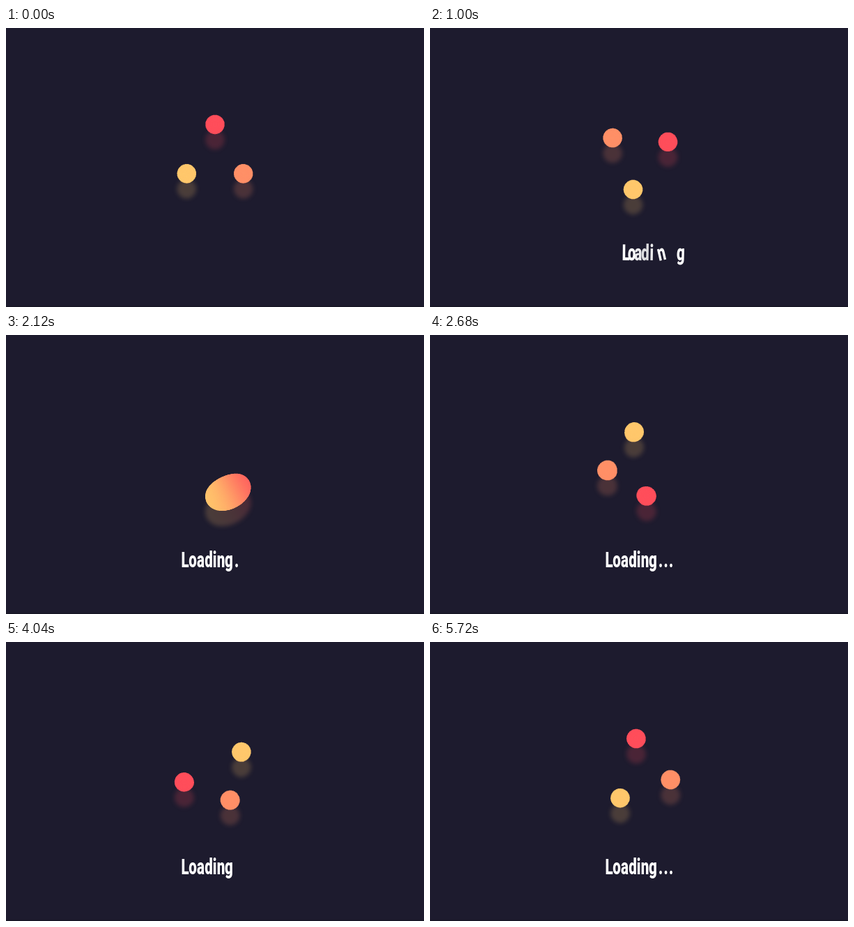
Recreate the animation shown at these times as an HTML page. Size 600 by 400 pixels, loop 5760 ms.

```html
<!DOCTYPE html>
<html lang="en">
<head>
<meta charset="utf-8">
<title>Loading</title>
<style>
  html, body { margin: 0; width: 100%; height: 100%; overflow: hidden; background: #1d1b2e; }
  svg { display: block; width: 600px; height: 400px; }
  text { font: 800 32px Roboto, "Open Sans", sans-serif; fill: #fff; text-anchor: middle; }
</style>
</head>
<body>
<svg viewBox="0 0 600 400">
  <defs>
    <!-- Blur the discs together, cut the alpha sharply, then add a soft shadow below. -->
    <filter id="goo" filterUnits="userSpaceOnUse" x="120" y="20" width="360" height="350"
            color-interpolation-filters="sRGB">
      <feGaussianBlur stdDeviation="18"/>
      <feColorMatrix values="1 0 0 0 0  0 1 0 0 0  0 0 1 0 0  0 0 0 82 -30.6" result="blob"/>
      <feOffset dy="22"/>
      <feGaussianBlur stdDeviation="3"/>
      <feColorMatrix values="1 0 0 0 0  0 1 0 0 0  0 0 1 0 0  0 0 0 .2 0" result="shadow"/>
      <feMerge>
        <feMergeNode in="shadow"/>
        <feMergeNode in="blob"/>
      </feMerge>
    </filter>
  </defs>
  <rect width="600" height="400" fill="#1d1b2e"/>
  <rect y="398.5" width="600" height="1.5" fill="#181725"/>
  <g id="balls" filter="url(#goo)"></g>
  <g id="word"></g>
</svg>
<script>
  const LOOP = 5760, STEP = 40, TURN_TIME = 5800;
  const CENTER = { x: 300, y: 185.3 }, ORBIT = 47, DISC = 20;
  const TEXT_Y = 322, CONDENSED = 0.64;

  const clamp = v => Math.max(0, Math.min(1, v));

  function add(parent, tag, attrs, content = '') {
    const el = document.createElementNS('http://www.w3.org/2000/svg', tag);
    for (const key in attrs) el.setAttribute(key, attrs[key]);
    el.textContent = content;
    return document.getElementById(parent).appendChild(el);
  }

  const balls = [
    { color: '#ff4d5a', start: -90, turns: 1 },
    { color: '#ff8f66', start: 30, turns: 3 },
    { color: '#ffc76b', start: 150, turns: 5 }
  ].map(b => ({ ...b, el: add('balls', 'circle', { r: DISC, fill: b.color }) }));

  const glyph = (char, x) => ({ x, el: add('word', 'text', { y: 11 }, char) });
  const centers = [257, 268, 279.5, 291, 299.5, 308.5, 320];
  const letters = [...'Loading'].map((char, i) => glyph(char, centers[i]));
  const dots = [331, 338.5, 346].map(x => glyph('.', x));

  function place({ el, x }, dx, angle, opacity) {
    el.setAttribute('transform',
      `translate(${x + dx} ${TEXT_Y}) rotate(${angle}) scale(${CONDENSED} 1)`);
    el.setAttribute('opacity', opacity);
  }

  function drawBalls(t) {
    for (const { el, start, turns } of balls) {
      const a = (start + 360 * turns * t / TURN_TIME) * Math.PI / 180;
      el.setAttribute('cx', CENTER.x + ORBIT * Math.cos(a));
      el.setAttribute('cy', CENTER.y + ORBIT * Math.sin(a));
    }
  }

  // Letters glide in from the right while a wave runs through the word.
  function drawLetters(t) {
    letters.forEach((letter, i) => {
      const p = clamp((t - 120 - 22 * i) / 1344);
      const wave = clamp((t - 1000) / 450 + (6 - i) / 6);
      const pull = Math.sin(Math.PI * wave ** 0.6);
      const dx = 203 * (1 - p) ** 2 - 15.5 * pull;
      const tilt = wave < 1 / 3 ? -14 * Math.sin(3 * Math.PI * wave) : 0;
      const angle = tilt + 40 * (1 - p) ** 4;
      const fade = 0.15 * Math.sin(Math.PI * wave) ** 4;
      place(letter, dx, angle, clamp(p * 12) * (1 - fade));
    });
  }

  // Dots count 1, 2, 3, 0 and finally rest at three.
  function drawDots(t) {
    const beat = Math.floor((Math.min(t, 4840) - 1540) / 300);
    const count = beat < 0 ? 0 : beat % 4;
    dots.forEach((dot, i) => place(dot, 0, 0, i < count ? 1 : 0));
  }

  function frame() {
    const t = Math.floor(performance.now() % LOOP / STEP) * STEP;
    drawBalls(t);
    drawLetters(t);
    drawDots(t);
    requestAnimationFrame(frame);
  }
  frame();
</script>
</body>
</html>
```
